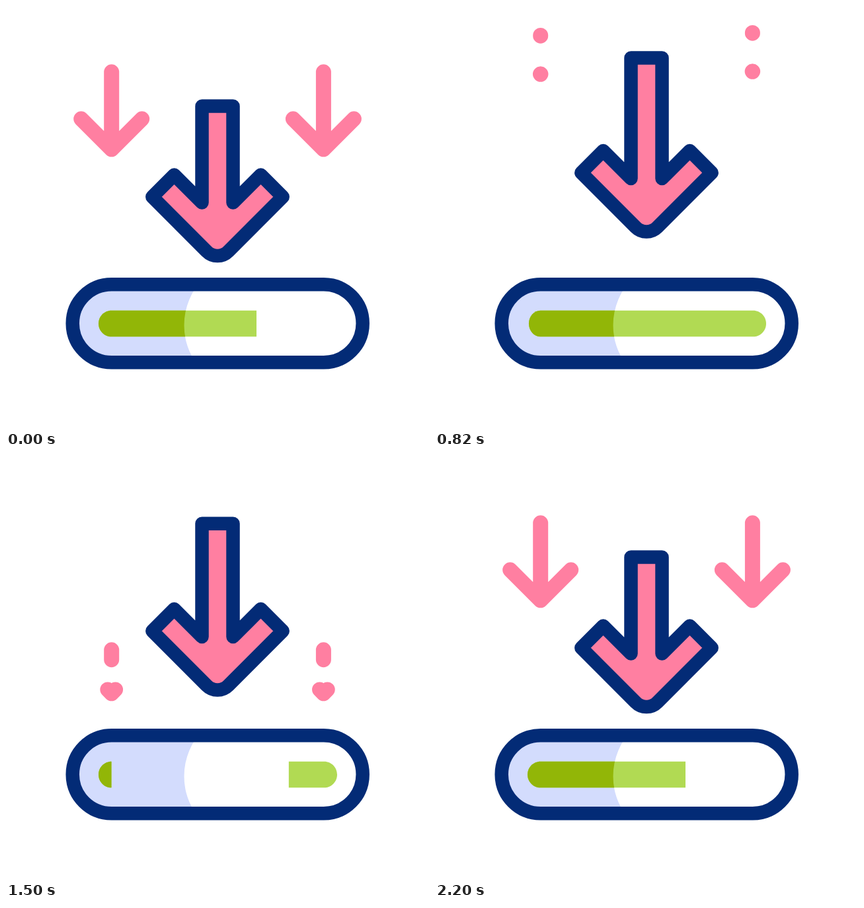
An HTML page for the animation above (2.22 s loop, 640 px wide and 640 px high).

```html
<!DOCTYPE html>
<html>
<head>
<meta charset="utf-8">
<style>
  html, body { margin: 0; height: 100%; overflow: hidden; background: #fff; }
  svg { display: block; width: 100vw; height: 100vh; }
  .side { fill: none; stroke: #ff7fa1; stroke-width: 23; }
  .edge { stroke: #032b76; stroke-width: 20.5; }
  path { stroke-linecap: round; stroke-linejoin: round; }
</style>
</head>
<body>
<svg viewBox="0 0 640 640">
  <defs>
    <clipPath id="shade"><path d="M90 411H299.9A100.5 100.5 0 0 0 299.9 555H90Z"/></clipPath>
  </defs>
  <path class="side" id="left"/>
  <path class="side" id="right"/>
  <path class="edge" id="arrow" fill="#ff7fa1"/>
  <rect x="100.7" y="421.3" width="439" height="118" rx="59" fill="#fff"/>
  <rect x="100.7" y="421.3" width="439" height="118" rx="59" fill="#d3dcfd" clip-path="url(#shade)"/>
  <path class="progress" fill="#b1da53"/>
  <path class="progress" fill="#92b607" clip-path="url(#shade)"/>
  <rect class="edge" x="100.7" y="421.3" width="439" height="118" rx="59" fill="none"/>
</svg>
<script>
const LOOP = 2220, CYCLE = 2200;
const $ = id => document.getElementById(id);
const linear = p => p;
const smooth = p => p * p * (3 - 2 * p);
const ramp = (t, a, b, ease = smooth) => ease(Math.min(1, Math.max(0, (t - a) / (b - a))));

// Keys are [time, value, easing into this key]; the default easing is linear.
function track(t, keys) {
  let value = keys[0][1];
  for (let i = 1; i < keys.length; i++) {
    const [t0, v0] = keys[i - 1], [t1, v1, ease = linear] = keys[i];
    if (t >= t0) value = v0 + (v1 - v0) * ramp(t, t0, t1, ease);
  }
  return value;
}

// The shaft top travels twice as far as the head, so the arrow stretches.
function mainArrow(t) {
  const s = track(t, [[0, 0], [600, 37], [800, -37, smooth], [1200, 37, smooth],
                      [1600, -37, smooth], [2200, 0]]);
  const y = v => v + s;
  return `M296.5 ${151.5 + 2 * s}H343.5V${y(297.5)}L385.5 ${y(255.5)}L418.7 ${y(288.7)}` +
    `L336.3 ${y(371.2)}A23 23 0 0 1 303.7 ${y(371.2)}L221.3 ${y(288.7)}` +
    `L254.5 ${y(255.5)}L296.5 ${y(297.5)}Z`;
}

function sideArrow(t, x, lag) {
  let tip, size;
  if (t < 700) {
    tip = 216.8 + 0.3224 * t;
    size = 1 - ramp(t, 0, 600);
  } else if (t < 1700) {
    tip = 98.5 + 290 * ramp(t, 793, 1679) + lag * ramp(t, 1300, 820, linear);
    size = Math.min(ramp(t, 800, 1248), 1 - ramp(t, 1152, 1600));
  } else {
    tip = 98.5 + 118.3 * ramp(t, 1800, 2200, linear);
    size = ramp(t, 1800, 2200);
  }
  if (size <= 0) return '';
  const mid = tip - 58.5, half = 58.5 * size, wing = 46 * size;
  return `M${x} ${mid - half}V${mid + half}` +
    `M${x - wing} ${tip - wing}L${x} ${tip}L${x + wing} ${tip - wing}`;
}

// One life of the progress bar: both ends bend from round to flat and back.
function progress(t) {
  if (t <= 1300 || t >= 3900) return '';
  const start = 159.5, end = 481.5, r = 19.5, top = 460.7, mid = 480.5, bottom = 500.3;
  const x1 = track(t, [[3200, start], [3800, end]]);
  const b1 = track(t, [[3000, -r], [3200, 0], [3800, 0], [3900, r]]);
  const x2 = track(t, [[1500, start], [2200, 379], [2800, end]]);
  const b2 = track(t, [[1300, -r], [1500, 0], [2800, 0], [3000, r]]);
  const k = 0.5523, h = 19.8 * k;
  const cap = (x, b, from, to, dy) =>
    `C${x + k * b} ${from} ${x + b} ${mid - dy} ${x + b} ${mid}` +
    `C${x + b} ${mid + dy} ${x + k * b} ${to} ${x} ${to}`;
  return `M${x1} ${top}H${x2}${cap(x2, b2, top, bottom, h)}H${x1}${cap(x1, b1, bottom, top, -h)}Z`;
}

function draw(now) {
  const t = Math.min(now % LOOP, CYCLE);
  $('arrow').setAttribute('d', mainArrow(t));
  $('left').setAttribute('d', sideArrow(t, 159.7, 4));
  $('right').setAttribute('d', sideArrow(t, 480.4, 0));
  const bars = progress(t) + progress(t + CYCLE);
  document.querySelectorAll('.progress').forEach(p => p.setAttribute('d', bars));
}

let begin;
function tick(now) {
  begin ??= now;
  draw(now - begin);
  requestAnimationFrame(tick);
}
draw(0);
requestAnimationFrame(tick);
</script>
</body>
</html>
```
